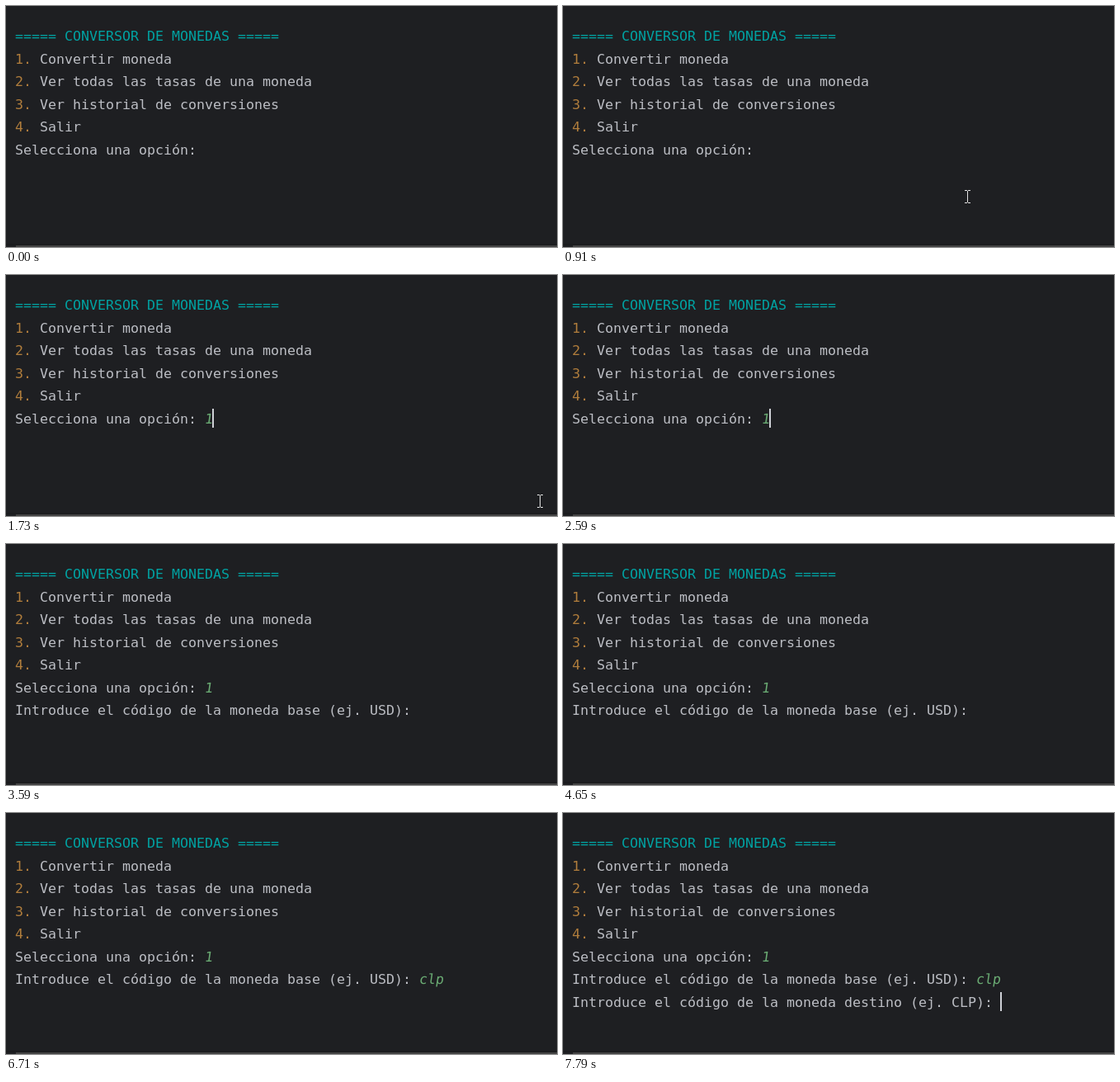
These frames come from a looping animation (668 by 292 pixels, 8000 ms). An HTML page with a canvas:

```html
<!DOCTYPE html>
<html lang="es">
<head>
<meta charset="utf-8">
<title>Conversor de monedas</title>
<style>
html, body { margin: 0; width: 100%; height: 100%; overflow: hidden; background: #1e1f22; }
canvas { display: block; }
</style>
</head>
<body>
<canvas id="stage" width="668" height="292"></canvas>
<script>
const ctx = document.getElementById('stage').getContext('2d');
const LOOP = 8000, BLINK = 530, TICK = 70;
const CELL = 10, LEFT = 11, PITCH = 27.5, PROMPT_ROW = 5, SLANT = 0.15;
const GREY = '#bcbec4', CYAN = '#00a3a3', AMBER = '#b07d3c', GREEN = '#6aab73';

const menu = ['Convertir moneda', 'Ver todas las tasas de una moneda',
  'Ver historial de conversiones', 'Salir'];
const prompts = ['Selecciona una opción: ',
  'Introduce el código de la moneda base (ej. USD): ',
  'Introduce el código de la moneda destino (ej. CLP): '];

// hold: how long the caret stays lit before it starts blinking
const steps = [
  { t: 0, line: 0, input: '', hold: 0 },
  { t: 1120, line: 0, input: '' },
  { t: 1390, line: 0, input: '1', hold: 670 },
  { t: 2660, line: 1, input: '', hold: 930 },
  { t: 4720, line: 1, input: 'c' },
  { t: 4920, line: 1, input: 'cl' },
  { t: 5120, line: 1, input: 'clp' },
  { t: 6050, line: 2, input: '', hold: 590, waiting: true },
  { t: 7790, line: 2, input: '' }
];

// The pointer travels from stop to stop, one move per tick
const stops = [[642, 247], [504, 227], [470, 219], [644, 266]];
const sweeps = [{ t: 500, moves: 2 }, { t: 740, moves: 4 }, { t: 1590, moves: 2 }];
const POINTER_OUT = 1800;

const rowY = (row, offset) => Math.round(offset + row * PITCH);

function write(text, col, row, color, slant = 0) {
  ctx.fillStyle = color;
  [...text].forEach((ch, i) => {
    const x = LEFT + (col + i) * CELL - slant * 5;
    ctx.setTransform(1, 0, -slant, 1, x, rowY(row, 42));
    ctx.fillText(ch, 0, 0);
  });
  ctx.resetTransform();
}

function rect(x, y, w, h, color) {
  ctx.fillStyle = color;
  ctx.fillRect(x, y, w, h);
}

function drawCaret(t, step) {
  const { line, input, hold = BLINK, waiting } = step;
  const dark = t - step.t - hold;
  const wait = hold === 0;
  if (wait || (dark >= 0 && Math.floor(dark / BLINK) % 2 === 0)) return;
  const row = PROMPT_ROW + line;
  const col = waiting ? 0 : prompts[line].length + input.length;
  const x = Math.max(12, 10 + col * CELL);
  const top = rowY(row, 24.5);
  rect(x, top, waiting ? 1 : 2, rowY(row, 47.4) - top, '#ced0d6');
}

function drawPointer(t) {
  const i = sweeps.findLastIndex(s => s.t <= t);
  if (i < 0 || t >= POINTER_OUT) return;
  const { t: start, moves } = sweeps[i];
  const k = Math.min(1, Math.floor((t - start) / TICK) / moves);
  const [x, y] = stops[i].map((v, n) => Math.round(v + (stops[i + 1][n] - v) * k));
  const color = '#e4e4e4';
  rect(x + 3, y + 1, 1, 14, color);
  for (const dy of [0, 15]) {
    rect(x, y + dy, 3, 1, color);
    rect(x + 4, y + dy, 3, 1, color);
  }
}

function draw(t) {
  rect(0, 0, 668, 292, '#1e1f22');
  rect(0, 288, 668, 2, '#1b1c1e');
  rect(12, 290, 656, 2, '#434343');
  ctx.font = '16.6px "DejaVu Sans Mono", "Noto Sans Mono", monospace';

  write('===== CONVERSOR DE MONEDAS =====', 0, 0, CYAN);
  menu.forEach((label, i) => {
    write(i + 1 + '.', 0, i + 1, AMBER);
    write(label, 3, i + 1, GREY);
  });

  const past = steps.filter(s => s.t <= t);
  prompts.forEach((prompt, line) => {
    const last = past.findLast(s => s.line === line);
    if (!last || last.waiting) return;
    write(prompt, 0, PROMPT_ROW + line, GREY);
    write(last.input, prompt.length, PROMPT_ROW + line, GREEN, SLANT);
  });

  drawCaret(t, past.at(-1));
  drawPointer(t);
}

function tick() {
  draw(performance.now() % LOOP);
  requestAnimationFrame(tick);
}
tick();
</script>
</body>
</html>
```
